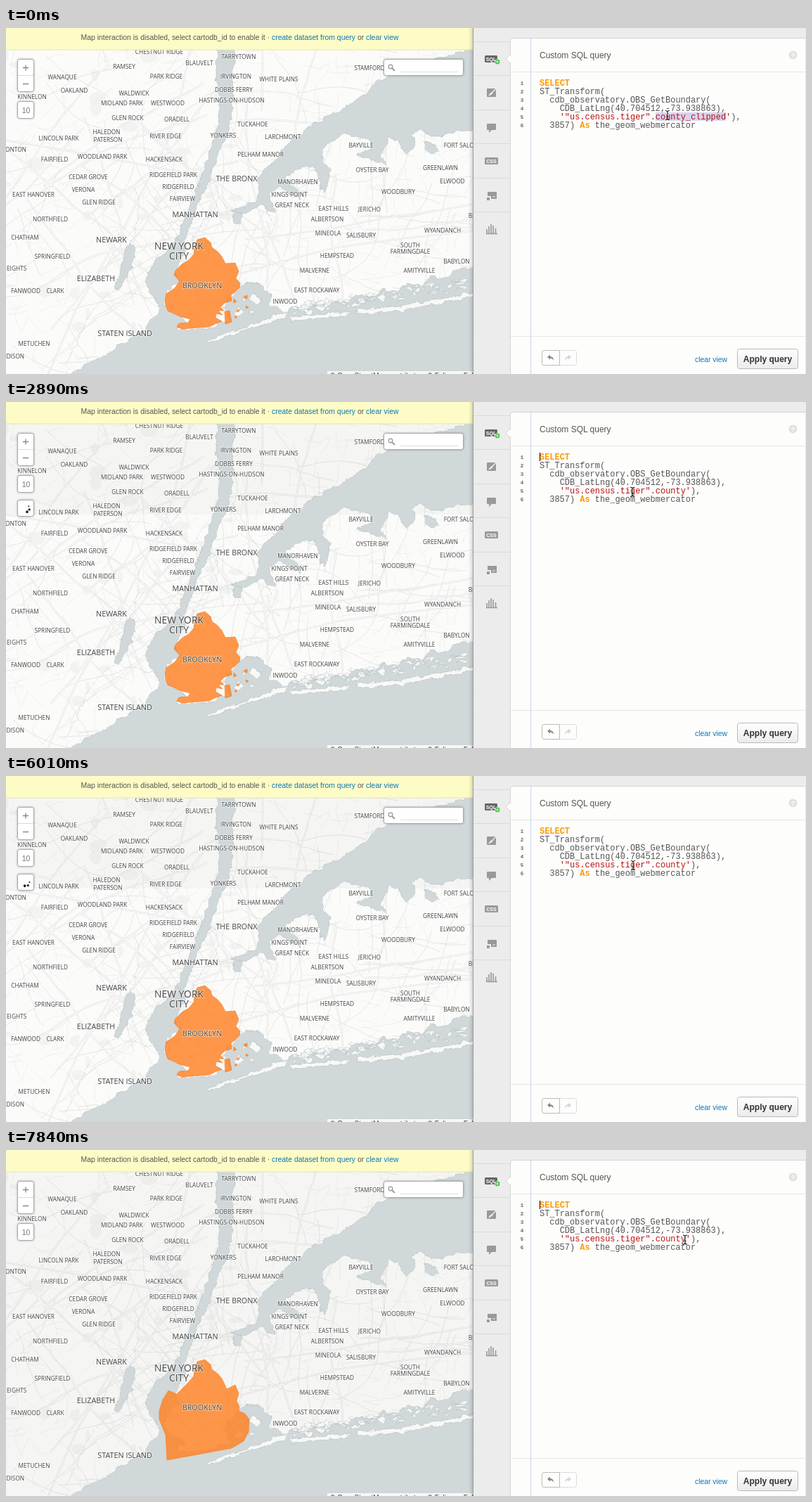
Animation of 1138 by 492 pixels, one loop 8000 ms. Source, as an HTML page:

```html
<!DOCTYPE html>
<html lang="en">
<head>
<meta charset="utf-8">
<title>Custom SQL query</title>
<style>
  html, body { margin: 0; width: 100%; height: 100%; overflow: hidden; background: #ececec; }
  svg { display: block; width: 1138px; height: 492px; font-family: "Liberation Sans", Arial, sans-serif; }
  .water path { fill: #d1d8d9; stroke: #b7c0c2; stroke-width: .7; }
  .water .channel { fill: none; stroke: #d1d8d9; }
  .water .land { fill: #f8f8f7; }
  .labels text { font-family: "Open Sans", sans-serif; font-weight: 500; fill: #444; text-anchor: middle;
    paint-order: stroke; stroke: #fff; stroke-opacity: .55; stroke-width: 1.8px; stroke-linejoin: round; }
  .code text { font: 11.95px "Liberation Mono", "Courier New", monospace; fill: #555; white-space: pre; }
  .code .kw { fill: #f90; font-weight: bold; }
  .code .str { fill: #b11; }
  .nums text { font: bold 7.5px "Liberation Mono", monospace; fill: #666; text-anchor: middle; }
  .box { fill: #fff; stroke: #a9a9a9; stroke-width: 1; filter: drop-shadow(0 0 1.5px rgba(0,0,0,.3)); }
  .link { fill: #0f76b6; }
  .banner { font-size: 10.45px; text-anchor: middle; fill: #555; }
  .icon { fill: #999; }
  .badge { font-size: 7px; font-weight: bold; fill: #fff; text-anchor: middle; }
  .rule { stroke: #dadada; }
  .orange { fill: #ff7f1e; fill-opacity: .8; stroke: #f5832c; stroke-width: .7; }
</style>
</head>
<body>
<svg viewBox="0 0 1138 492">
  <defs>
    <clipPath id="mapClip"><rect width="664" height="492"/></clipPath>
    <filter id="rough" filterUnits="userSpaceOnUse" x="-10" y="-10" width="690" height="520" color-interpolation-filters="sRGB">
      <feTurbulence type="fractalNoise" baseFrequency=".09" numOctaves="3" seed="4"/>
      <feDisplacementMap in="SourceGraphic" scale="9" xChannelSelector="R" yChannelSelector="G"/>
    </filter>
    <linearGradient id="btn" x2="0" y2="1"><stop stop-color="#fff"/><stop offset="1" stop-color="#ebebeb"/></linearGradient>
    <linearGradient id="edge"><stop stop-color="#000" stop-opacity="0"/><stop offset="1" stop-color="#000" stop-opacity=".14"/></linearGradient>
  </defs>

  <g clip-path="url(#mapClip)">
    <rect width="664" height="492" fill="#fbfbfa"/>
    <g id="roads" fill="none" stroke-linejoin="round"></g>
    <rect id="tint" width="664" height="0" opacity=".022"/>

    <g class="water" filter="url(#rough)">
      <path d="M301 20L299 70 304 100 301 140 288 180 273 225 257 262 243 302 252 310 267 265 285 225 303 180 318 140 323 100 322 65 328 20Z"/>
      <path d="M318 262L340 252 357 245 361 224 358 212 372 196 386 184 398 168 416 156 430 142 447 132 462 124 480 114 498 103 512 92 528 76 552 66 580 54 610 44 640 35 674 26V148L642 146 622 154 604 154 592 142 578 152 584 168 570 180 558 162 544 154 540 168 532 182 542 194 528 190 512 184 500 178 520 174 516 160 498 154 478 150 456 166 448 180 452 192 464 200 460 216 452 234 446 218 440 198 424 196 408 206 396 212 402 222 414 230 420 242 406 236 390 226 378 230 374 244 382 258 374 262 366 250 350 258 336 266Z"/>
      <path d="M594 162L610 166 618 176 604 178 596 172Z"/>
      <path d="M243 298L255 316 246 336 240 347 245 360 228 374 226 392 230 402 248 410 256 416 244 420 244 429 288 428 306 420 318 416 310 396 314 388 330 374 336 366 350 362 366 368 378 380 374 392 388 398 396 404 412 396 424 400 438 392 452 398 468 388 486 390 500 380 520 382 534 372 556 374 570 364 590 366 606 354 626 356 644 342 674 340V502H80L112 478 140 466 168 448 192 432 212 410 218 398 212 386 206 376 198 360 206 340 214 330 224 322 232 312Z"/>
      <path d="M178 306L184 316 180 336 171 356 160 373 154 370 162 350 167 328 170 310Z"/>
      <path d="M322 262L336 264 334 278 326 276Z"/>
      <path class="channel" stroke-width="6" d="M250 322L262 312 268 296 280 276 296 264 324 261"/>
      <path class="channel" stroke-width="3" d="M212 384L190 380 156 373 138 384 122 404 108 432 100 452 84 478M177 308L186 276 190 250 184 226M296 264L304 236 296 214M372 260L378 274M454 232L456 242"/>
      <path class="land" d="M284 447L300 438 340 426 372 413 390 405 402 404 397 412 360 424 320 436 288 449Z"/>
      <path class="land" d="M402 411L440 407 480 403 494 405 470 411 408 418Z"/>
      <path class="land" d="M498 401L560 395 620 385 674 372V379L620 391 560 402 500 407Z"/>
      <path class="land" d="M352 378L362 384 356 394 346 388ZM338 380L344 384 338 390ZM330 398L338 402 330 410 324 406ZM344 404L352 402 350 410Z"/>
      <g id="marsh"></g>
    </g>

    <g id="clipped" class="orange">
      <path d="M272 301L283 298 291 305 293 312 301 318 307 325 312 335 326 334 331 346 327 356 333 363 332 369 326 375 320 380 321 388 311 391 305 397 310 402 302 402 308 408 299 406 298 412 307 417 297 421 289 425 250 428 243 425 246 420 259 419 262 414 247 410 230 402 226 390 228 378 240 370 247 360 239 351 241 345 250 336 260 330 267 322 269 308Z"/>
      <path d="M311 403L318 402 321 418 312 421ZM338 382L343 380 343 384 340 385ZM341 395L345 397 342 399ZM328 402L332 400 331 404ZM325 411L329 409 327 413ZM324 385L328 389 324 391Z"/>
    </g>
    <path id="county" class="orange" d="M272 301L283 298 291 305 293 312 301 318 307 325 314 340 326 334 331 346 328 357 332 365 331 371 340 375 346 383 345 401 338 414 321 424 229 441 227 405 218 383 218 371 223 355 231 342 243 347 256 334 267 322 269 308Z"/>
    <g id="labels" class="labels"></g>

    <rect x="457" y="488" width="207" height="4" fill="#fff" opacity=".8"/>
    <text x="461" y="498" font-size="10" fill="#444">© OpenStreetMap contributors © Folimap, Folimap attribution</text>

    <g id="controls" font-size="13" fill="#777" text-anchor="middle">
      <rect class="box" x="16.500" y="44.500" width="23" height="46" rx="3"/>
      <path d="M17 67.500H39" class="rule"/>
      <path d="M24 56.500H32M28 52.500V60.500M24 79.500H32" stroke="#888" stroke-width="1.300"/>
      <rect class="box" x="16.500" y="104.500" width="23" height="24" rx="3"/>
      <text x="28.500" y="120.500" font-size="10.500">10</text>
    </g>
    <g id="loader">
      <rect class="box" x="16.500" y="139.500" width="23" height="23" rx="3"/>
      <g id="spin" fill="#222">
        <circle cx="5" r="1.900"/>
        <circle cx="5" r="1.600" transform="rotate(-55)"/>
        <circle cx="5" r="1" transform="rotate(-115)"/>
      </g>
    </g>
    <rect class="box" x="537.500" y="44.500" width="113" height="23" rx="3"/>
    <g fill="none" stroke="#999"><circle cx="547" cy="55" r="2.800" stroke-width="1.300"/><path d="M549 57L553 61" stroke-width="1.800"/><path d="M561 62.500H643" stroke="#ddd"/></g>

    <g id="notice" class="banner">
      <rect width="664" height="31" fill="#fdfcc5" opacity=".97"/>
      <path d="M0 31H664" stroke="#e5e3b0"/>
      <text x="332.500" y="17">Map interaction is disabled, select cartodb_id to enable it · <tspan class="link">create dataset from query</tspan> or <tspan class="link">clear view</tspan></text>
    </g>
    <g id="loading" class="banner">
      <rect width="664" height="31" fill="#e9fcec"/>
      <path d="M0 31H664" stroke="#cfe6d3"/>
      <text x="332.500" y="17">Loading query</text>
    </g>
    <rect x="658" width="6" height="492" fill="url(#edge)"/>
  </g>

  <rect x="664" width="474" height="492" fill="#ececec"/>
  <path d="M664.500 0V492" stroke="#999"/>
  <path d="M665 19.500H717M665 67.500H717M665 116.500H717M665 164.500H717M665 213.500H717M665 261.500H717" class="rule"/>
  <path d="M717.500 492V18Q717.500 14.500 721 14.500H1138V492" fill="#fdfdfc" stroke="#d4d4d4"/>
  <path d="M717 38L711 44 717 50" fill="#fdfdfc" stroke="#d4d4d4"/>
  <rect x="717" y="39" width="2" height="10" fill="#fdfdfc"/>
  <path d="M718 62.500H1138M718 438.500H1138" stroke="#e6e6e6"/>
  <path d="M746.500 15V492" stroke="#dbe6f5" stroke-width="2"/>

  <g class="icon">
    <rect x="681" y="39" width="18" height="10" rx="1.500" fill="#666"/>
    <circle cx="699" cy="48" r="3.700" fill="#35b535" stroke="#ececec" stroke-width=".7"/>
    <rect x="684" y="86" width="13" height="12" rx="1"/>
    <path d="M697.500 85.500L691 92.500M690.500 92L687 96 691.500 93Z" fill="#ececec" stroke="#ececec" stroke-width="1.500"/>
    <path d="M685 136H696Q697 136 697 137V144Q697 145 696 145H691L687 149V145H685Q684 145 684 144V137Q684 136 685 136Z"/>
    <rect x="681" y="184" width="19" height="10" rx="1.500"/>
    <path d="M685 233H698V243H690V239H685ZM684 241H688V245H684Z"/>
    <path d="M684 292V286M687 292V282M690 292V279M693 292V281M696.500 292V285M683 292.500H699" stroke="#999" stroke-width="1.600"/>
    <path d="M692 240H696" stroke="#ececec"/>
    <text class="badge" x="690" y="46.500">SQL</text><text class="badge" x="690.500" y="191.500">CSS</text>
    <path d="M699 45.700V50.300M696.700 48H701.300" stroke="#fff" stroke-width=".9"/>
    <circle cx="1119.500" cy="38.500" r="6" fill="#e2e2e2"/><text class="badge" x="1119.500" y="41.500" style="font-size:8.500px">?</text>
  </g>
  <text x="759" y="43" font-size="12" fill="#555">Custom SQL query</text>

  <rect id="sel" x="924" y="120" width="100" height="12" fill="#d7d4f0"/>
  <g id="nums" class="nums"></g>
  <g class="code">
    <text x="759" y="82" class="kw">SELECT</text>
    <text x="759" y="94">ST_Transform(</text>
    <text x="773.300" y="106">cdb_observatory.OBS_GetBoundary(</text>
    <text x="787.700" y="118">CDB_LatLng(40.704512,-73.938863),</text>
    <text x="787.700" y="130"><tspan class="str">'"us.census.tiger".<tspan id="word"></tspan>'</tspan>),</text>
    <text x="773.300" y="142">3857) <tspan class="kw">As</tspan> the_geom_webmercator</text>
  </g>
  <rect id="caret" width="1" height="12" fill="#000"/>
  <g id="mouse" fill="none">
    <path id="halo" stroke="#fff" stroke-width="2.400" opacity=".7"/>
    <path id="beam" stroke="#111" stroke-width="1.100"/>
  </g>

  <rect x="762.500" y="458.500" width="49" height="21" rx="3" fill="#fdfdfc" stroke="#dcdcdc"/>
  <path d="M787.500 458.500H765.500Q762.500 458.500 762.500 461.500V476.500Q762.500 479.500 765.500 479.500H787.500Z" fill="#fdfdfc" stroke="#bbb"/>
  <path d="M770 468L774 464.500V467Q779 467 779 473Q777.500 469.500 774 469.500V471.500Z" fill="#888"/>
  <path d="M804 468L800 464.500V467Q795 467 795 473Q796.500 469.500 800 469.500V471.500Z" fill="#d5d5d5"/>
  <text x="980" y="475" font-size="10.350" class="link">clear view</text>
  <rect x="1040.500" y="456.500" width="86" height="28" rx="3" fill="url(#btn)" stroke="#b9b9b9"/>
  <text x="1083.500" y="474.500" font-size="12" font-weight="bold" fill="#333" text-anchor="middle">Apply query</text>
</svg>

<script>
const $ = id => document.getElementById(id);
const NS = 'http://www.w3.org/2000/svg';
function add(parent, tag, attrs, text) {
  const el = document.createElementNS(NS, tag);
  for (const k in attrs) el.setAttribute(k, attrs[k]);
  if (text) el.textContent = text;
  parent.appendChild(el);
}

let seed = 11;
const rnd = () => (seed = seed * 16807 % 2147483647) / 2147483647;

// A wandering street line.
function street(x, y, dir, count, len, bend) {
  let d = `M${x.toFixed(1)} ${y.toFixed(1)}`;
  for (let i = 0; i < count; i++) {
    dir += (rnd() - .5) * bend;
    x += Math.cos(dir) * len;
    y += Math.sin(dir) * len;
    d += `L${x.toFixed(1)} ${y.toFixed(1)}`;
  }
  return d;
}
function streets(total, count, len, bend) {
  let d = '';
  for (let i = 0; i < total; i++) {
    const x = rnd() * 680, y = 20 + rnd() * 470;
    const dir = (x < 330 ? .95 : .1) + Math.floor(rnd() * 4) * Math.PI / 2 + (rnd() - .5) * .5;
    d += street(x, y, dir, count, len, bend);
  }
  return d;
}
const roads = $('roads');
for (let i = 0; i < 45; i++)
  add(roads, 'ellipse', { cx: rnd() * 330, cy: 30 + rnd() * 430, rx: 3 + rnd() * 10, ry: 3 + rnd() * 8, fill: '#f3f4f2' });
add(roads, 'path', { d: streets(620, 4, 7, .7), stroke: '#ebebea', 'stroke-width': .7 });
add(roads, 'path', { d: streets(130, 9, 12, .5), stroke: '#e1e1e0', 'stroke-width': .8 });
const highways = streets(24, 16, 17, .35) +
  'M340 300L400 294 470 284 540 270 600 262 670 250M330 350L400 330 470 312 560 300 670 288M0 160L90 175 170 190 250 205 330 190M60 492L100 400 135 340 170 280 200 220 230 160 250 90 262 30';
add(roads, 'path', { d: highways, stroke: '#d8d8d7', 'stroke-width': 2.2 });
add(roads, 'path', { d: highways, stroke: '#fff', 'stroke-width': 1.2 });

for (let i = 0; i < 60; i++) {
  const x = 408 + rnd() * 250, y = 401 - (x - 408) * .15 + (rnd() - .5) * 15, w = 2 + rnd() * 7, h = 1 + rnd() * 3;
  add($('marsh'), 'path', { class: 'land', d: `M${x - w} ${y}L${x} ${y - h} ${x + w} ${y - 1} ${x + 1} ${y + h}Z` });
}

const west = `CHESTNUT RIDGE 218 34|BLAUVELT 275 50|RAMSEY 168 55|PARK RIDGE 228 69|WANAQUE 80 70|KINNELON 37 98|OAKLAND 97 89
|WALDWICK 182 93|MIDLAND PARK 165 107|WESTWOOD 230 107|GLEN ROCK 173 128|ORADELL 243 130|HALEDON 143 148|RIVER EDGE 227 154
|LINCOLN PARK 75 157|PATERSON 145 159|HACKENSACK 225 187|FAIRFIELD 69 187|BOONTON 8 173|WOODLAND PARK 137 183|CEDAR GROVE 117 212
|RIDGEFIELD PARK 238 209|RIDGEFIELD 245 226|VERONA 110 230|EAST HANOVER 39 237|GLEN RIDGE 132 248|FAIRVIEW 251 243
|NORTHFIELD 63 272|CHATHAM 27 298|SPRINGFIELD 66 325|HEIGHTS 12 342|FANWOOD 28 374|CLARK 70 374|METUCHEN 40 449|EDISON 11 467`;
const east = `TARRYTOWN 331 41|IRVINGTON 327 69|WHITE PLAINS 388 73|DOBBS FERRY 324 88|HASTINGS-ON-HUDSON 321 103|TUCKAHOE 351 137
|YONKERS 309 153|LARCHMONT 394 155|PELHAM MANOR 362 180|STAMFORD 517 57|BAYVILLE 505 167|OYSTER BAY 521 202|FORT SALONGA 653 167
|GREENLAWN 618 199|ELWOOD 635 218|WOODBURY 558 233|MANORHAVEN 415 219|KINGS POINT 403 237|GREAT NECK 407 252|EAST HILLS 466 257
|JERICHO 517 258|ALBERTSON 457 272|MINEOLA 458 292|SALISBURY 505 295|WYANDANCH 621 288|SOUTH 575 309|FARMINGDALE 575 318
|HEMPSTEAD 471 324|BABYLON 641 332|AMITYVILLE 588 345|MALVERNE 439 345|EAST ROCKAWAY 442 373|INWOOD 397 389|BRENTWOOD 684 267`;
const large = 'THE BRONX 328 214|MANHATTAN 269 265|NEWARK 150 301|ELIZABETH 128 356|STATEN ISLAND 169 434|BROOKLYN 279 366';
function place(list, size) {
  for (const item of list.split('|')) {
    const [, name, x, y] = item.trim().match(/(.+) (\d+) (\d+)/);
    add($('labels'), 'text', { x, y: +y + size * .36, 'font-size': size }, name);
  }
}
place(west, 8.3);
place(east, 8.3);
place(large, 10.8);
place('NEW YORK 246 310|CITY 246 324', 13.9);

for (let i = 0; i < 6; i++) add($('nums'), 'text', { x: 734, y: 81 + i * 12 }, String(i + 1));

const beam = 'M-3 -6.5Q0 -6.5 0 -4.5Q0 -6.5 3 -6.5M0 -5V5M-3 6.5Q0 6.5 0 4.5Q0 6.5 3 6.5M-1.5 2H1.5';
for (const id of ['halo', 'beam']) $(id).setAttribute('d', beam);

const mix = (t, keys) => {
  let i = 0;
  while (i < keys.length - 1 && t >= keys[i + 1][0]) i++;
  const [a, u] = keys[i], [b, v] = keys[i + 1] || keys[i];
  return b > a ? u + (v - u) * Math.min(1, Math.max(0, (t - a) / (b - a))) : u;
};
const show = (id, on) => $(id).style.display = on ? '' : 'none';
const typed = [1575, 1660, 1840, 1930, 2020];
const within = (t, a, b) => t >= a && t < b;

function draw(t) {
  const word = t < 480 ? 'county_clipped' : 'county'.slice(0, 1 + typed.filter(k => t >= k).length);
  if ($('word').textContent !== word) $('word').textContent = word;
  show('sel', t < 480);

  const home = t >= 2650;
  const blink = (t - 7490 + 10600) % 1060 < 530;
  show('caret', within(t, 480, 950) || within(t, 1490, 2550) || within(t, 2650, 3250) || (t >= 3250 && blink));
  $('caret').setAttribute('x', home ? 759 : 924 + 7.17 * word.length);
  $('caret').setAttribute('y', home ? 72 : 120);

  const mx = mix(t, [[0, 941], [2450, 941], [2820, 891], [3240, 892], [7030, 892], [7490, 937], [7670, 937], [7840, 966]]);
  const my = mix(t, [[0, 124], [2450, 124], [2820, 128], [3240, 127], [7030, 127], [7490, 121.5], [7670, 121.5], [7840, 127.5]]);
  $('mouse').setAttribute('transform', `translate(${mx} ${my})`);

  const busy = within(t, 2380, 2700);
  show('loading', busy);
  show('notice', !busy);
  const lift = t < 2380 ? 0 : mix(t, [[2380, -10], [2640, -10], [2840, 0]]);
  $('controls').setAttribute('transform', `translate(0 ${lift})`);

  show('loader', within(t, 2740, 6790));
  $('loader').setAttribute('opacity', mix(t, [[0, 1], [6540, 1], [6620, .3], [6790, 0]]));
  $('spin').setAttribute('transform', `translate(28.5 151.5) rotate(${110 + (t - 4490) / 760 * 360})`);

  const done = t >= 6540;
  show('clipped', !done);
  show('county', done);
  $('tint').setAttribute('height', t < 2380 ? 0 : t < 2700 ? 132 : done ? 492 : 160);
}

const start = performance.now();
function tick() {
  draw((performance.now() - start) % 8000);
  requestAnimationFrame(tick);
}
tick();
</script>
</body>
</html>
```
